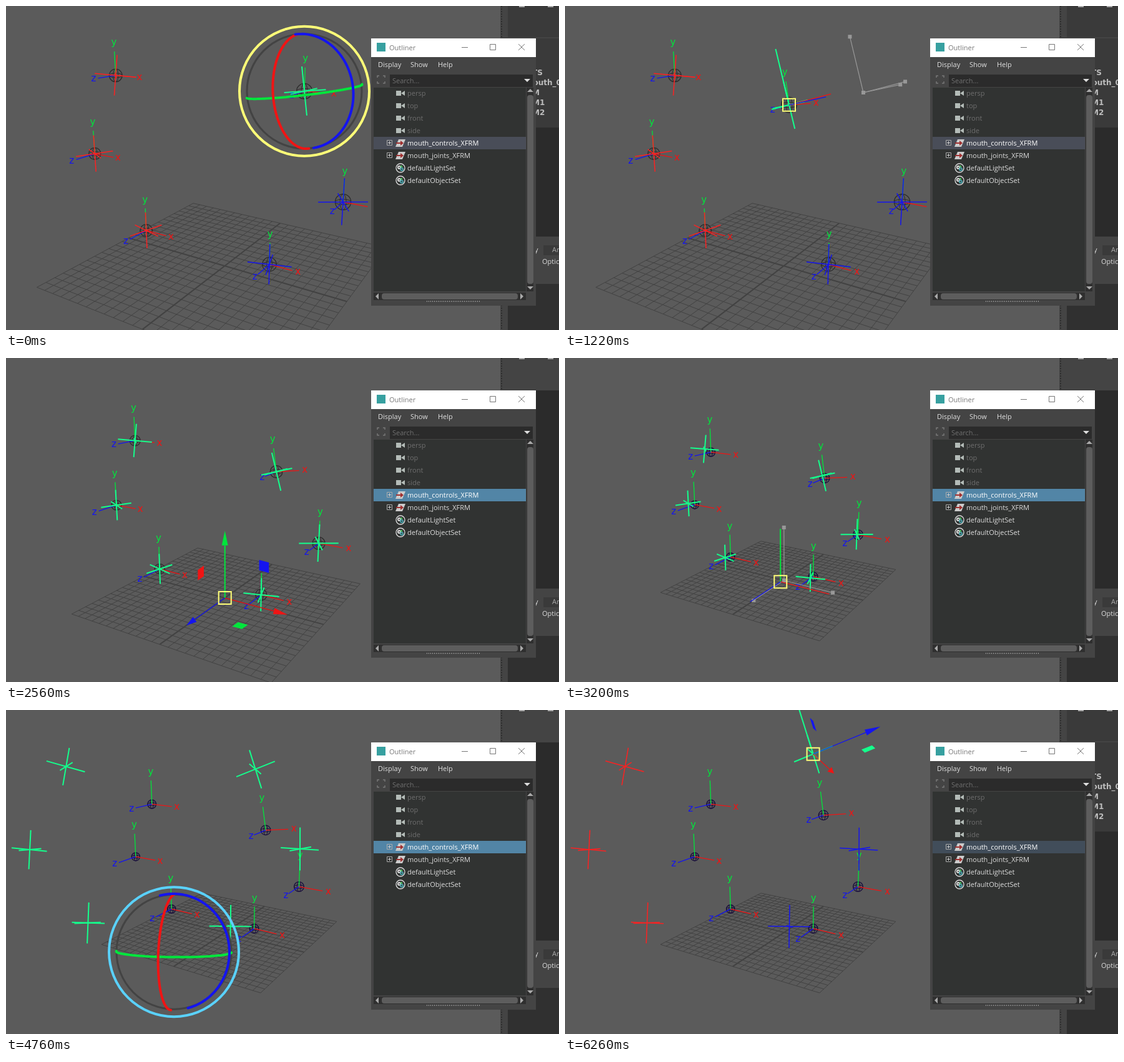
Animation, 886 px wide and 520 px high, one loop 6.8 s. Source, as an HTML page with a canvas:

```html
<!DOCTYPE html>
<html lang="en">
<head>
<meta charset="utf-8">
<title>Outliner</title>
<style>
html, body { margin: 0; width: 100%; height: 100%; overflow: hidden; background: #5b5b5b; }
canvas { display: block; }
</style>
</head>
<body>
<canvas id="stage" width="886" height="520"></canvas>
<script>
const g = document.getElementById('stage').getContext('2d');
const LOOP = 6800, SELECT_ALL = 2120, GROUP_DRAG = 3080, ROTATE = 4000, SELECT_ONE = 4860, PULL = 5000;
const RED = '#f01414', GREEN = '#00e63c', BLUE = '#1414f0', PICK = '#14ff8c', YELLOW = '#ffff78';
const UI = '11px "Open Sans", sans-serif', RAD = Math.PI / 180;

// Camera: focal length, picture centre, yaw, pitch, place of the world origin
const FOCAL = 855, CENTRE = [352, 232], YAW = 31.5 * RAD, PITCH = 15.43 * RAD;
const ORIGIN = [-.09, 10.98, 75.1], DOLLY = 24.4;

// Rig points in the plane z = 2, with the yaw and roll of their controls
const rig = [
  { x: -10.7, y: 17.6, yaw: -45, roll: -7 },
  { x: -14.1, y: 9.5, yaw: -63, roll: 0 },
  { x: -7.8, y: 2.6, yaw: -76, roll: 0 },
  { x: 5.7, y: 2.6, yaw: -18, roll: 0 },
  { x: 11.8, y: 9.5, yaw: -32, roll: 0 },
  { x: 7.1, y: 16, yaw: 9, roll: 18 }];
const TIP = 5;
const GROUP_MOVE = [8.25, 8.4, 22.6];
const PULL_FROM = [12, -14];

const add = (a, b) => a.map((v, i) => v + b[i]);
const mul = (a, k) => a.map(v => v * k);
const dot = (a, b) => a.reduce((s, v, i) => s + v * b[i], 0);

// Rotate v about the vector r, whose length is the angle in degrees
function turn(v, r) {
  const deg = Math.hypot(...r);
  if (!deg) return v;
  const [x, y, z] = mul(r, 1 / deg), c = Math.cos(deg * RAD), s = Math.sin(deg * RAD);
  const side = [y * v[2] - z * v[1], z * v[0] - x * v[2], x * v[1] - y * v[0]];
  return add(add(mul(v, c), mul(side, s)), mul([x, y, z], dot([x, y, z], v) * (1 - c)));
}

// World direction in camera space: right, down, forward
function view([x, y, z]) {
  const across = x * Math.cos(YAW) - z * Math.sin(YAW), depth = -x * Math.sin(YAW) - z * Math.cos(YAW);
  return [across, -y * Math.cos(PITCH) - depth * Math.sin(PITCH), depth * Math.cos(PITCH) - y * Math.sin(PITCH)];
}
const screen = q => [CENTRE[0] + FOCAL * q[0] / q[2], CENTRE[1] + FOCAL * q[1] / q[2]];
// How a short camera space direction at q appears on the screen
const slant = (q, v) => [v[0] - q[0] / q[2] * v[2], v[1] - q[1] / q[2] * v[2]];
const shift = (q, px) => add(q, [px[0] * q[2] / FOCAL, px[1] * q[2] / FOCAL, 0]);

// Camera space axes y, x, z after roll, yaw and a free rotation
function frame(yaw = 0, roll = 0, spin = [0, 0, 0], side = 1) {
  return [[0, 1, 0], [1, 0, 0], [0, 0, side]].map(v => view(turn(turn(turn(v, [0, 0, roll]), [0, -yaw, 0]), spin)));
}

// Smooth curve through keys [time, values...] without overshoot
function track(t, keys) {
  const last = keys.length - 1;
  if (t <= keys[0][0]) return keys[0].slice(1);
  if (t >= keys[last][0]) return keys[last].slice(1);
  const i = keys.findIndex(k => k[0] > t) - 1, h = keys[i + 1][0] - keys[i][0], u = (t - keys[i][0]) / h;
  const slope = (n, j) => (keys[n + 1][j] - keys[n][j]) / (keys[n + 1][0] - keys[n][0]);
  const tangent = (n, j) => {
    if (n < 1 || n >= last) return 0;
    const a = slope(n - 1, j), b = slope(n, j);
    return a * b <= 0 ? 0 : 2 * a * b / (a + b);
  };
  return keys[i].slice(1).map((p, n) => {
    const j = n + 1, q = keys[i + 1][j], v = 1 - u;
    return p * (1 + 2 * u) * v * v + q * u * u * (3 - 2 * u)
      + h * u * v * (tangent(i, j) * v - tangent(i + 1, j) * u);
  });
}

function path(points, color, width = 1, closed = false) {
  g.beginPath();
  points.forEach(p => g.lineTo(p[0], p[1]));
  if (closed) g.closePath();
  g.strokeStyle = color; g.lineWidth = width; g.stroke();
}
function poly(points, color) {
  g.beginPath();
  points.forEach(p => g.lineTo(p[0], p[1]));
  g.fillStyle = color; g.fill();
}
function rect(x, y, w, h, color) { g.fillStyle = color; g.fillRect(x, y, w, h); }
function pill(x, y, w, h, color) {
  g.beginPath(); g.roundRect(x, y, w, h, 4); g.fillStyle = color; g.fill();
}
function oval(x, y, rx, ry, color, width = 1) {
  g.beginPath(); g.ellipse(x, y, rx, ry, 0, 0, 7);
  g.strokeStyle = color; g.lineWidth = width; g.stroke();
}
function text(s, x, y, color, font = UI, align = 'left') {
  g.font = font; g.textAlign = align; g.fillStyle = color; g.fillText(s, x, y + 4);
}

function grid(place) {
  for (let i = -12; i <= 12; i++) {
    const line = (a, b) => path([screen(place(a)), screen(place(b))], '#424242', i ? 1 : 2);
    line([i, 0, -12], [i, 0, 12]);
    line([-12, 0, i], [12, 0, i]);
  }
}

function joint(q, roll, color) {
  const [x, y] = screen(q), r = .6 * FOCAL / q[2];
  oval(x, y, r, r, color, 1.3);
  oval(x, y, r, r * .35, color);
  oval(x, y, r * .4, r, color);
  frame(0, roll).forEach((axis, n) => {
    const v = mul(slant(q, axis), 51), ink = [GREEN, RED, BLUE][n];
    path([[x, y], add([x, y], mul(v, n ? .8 : .75))], ink, 1.3);
    text('yxz'[n], x + v[0], y + v[1] - (n ? 0 : 1), ink, '15px "DejaVu Sans", sans-serif', 'center');
  });
}

function cross(q, axes, color, width) {
  axes.forEach(v => path([screen(add(q, mul(v, -1.9))), screen(add(q, mul(v, 1.9)))], color, width));
}

// Rotate tool: the near half of each great circle
function rings(q, axes, outer) {
  const p = screen(q);
  oval(...p, 92, 92, '#434343', 3);
  axes.forEach((_, n) => {
    const u = axes[(n + 1) % 3], w = axes[(n + 2) % 3];
    const at = a => add(mul(u, Math.cos(a)), mul(w, Math.sin(a)));
    g.beginPath();
    for (let i = 0; i < 90; i++) {
      const a = at(i * 4 * RAD), b = at((i + 1) * 4 * RAD);
      if (dot(a, q) > 0) continue;
      g.moveTo(...add(p, mul(slant(q, a), 92)));
      g.lineTo(...add(p, mul(slant(q, b), 92)));
    }
    g.lineCap = 'round';
    g.strokeStyle = [GREEN, RED, BLUE][n]; g.lineWidth = 4; g.stroke();
    g.lineCap = 'butt';
  });
  oval(...p, 104, 104, outer, 4);
}

// Move tool; while dragging, grey handles stay at the start
function mover(q, axes, colors, start) {
  const p = screen(q), arms = axes.map(v => mul(slant(q, v), 92));
  if (start) {
    const ends = arms.map(v => add(start, v));
    ends.forEach(e => path([start, e], '#989898', 1.2));
    [start, ...ends].forEach(e => rect(e[0] - 3, e[1] - 3, 6, 6, '#989898'));
  }
  arms.forEach((v, n) => {
    const end = add(p, v), side = mul([-v[1], v[0]], 5 / Math.hypot(...v));
    path([p, end], colors[n], n ? 1.3 : 2);
    if (start) return;
    poly([add(end, side), add(p, mul(v, 1.28)), add(end, mul(side, -1))], colors[n]);
    const a = arms[(n + 1) % 3], b = arms[(n + 2) % 3];
    const at = (j, k) => add(p, add(mul(a, j), mul(b, k)));
    poly([at(.7, .7), at(.9, .7), at(.9, .9), at(.7, .9)], colors[n]);
  });
  path([[-10, -10], [10, -10], [10, 10], [-10, 10]].map(v => add(p, v)), YELLOW, 2, true);
}

function scene(t) {
  const all = t >= SELECT_ALL && t < SELECT_ONE;
  const [dolly] = track(t, [[2360, DOLLY], [2800, 0]]);
  const [sway] = track(t, [[0, 8.6], [360, -10], [600, 4], [780, 0]]);
  const [go] = track(t, [[GROUP_DRAG, 0], [3200, .1], [3980, 1]]);
  const spin = track(t, [[ROTATE, 0, 0, 0], [4160, -1.8, -.9, -2.9], [4520, -24, 25, 8], [4800, -19.5, 20.5, 6.5]]);
  // Pixels by which the single control is pulled off its place
  const pull = track(t, [[1000, 24, -33], [1220, -95, -11], [1460, -46, -2], [1700, 28, -34], [1940, 0, 0],
    [4500, 0, 0], [4760, ...PULL_FROM], [PULL, ...PULL_FROM], [5300, -40, -16], [5480, -62, -7],
    [5720, -30, 34], [5960, 17, -13], [6080, 17, -29], [6260, 10, -38]]);
  const jointPull = t < ROTATE ? pull : t < PULL ? [0, 0] : add(pull, mul(PULL_FROM, -1));

  const place = p => add(add(view(p), ORIGIN), [0, 0, -dolly]);
  const move = mul(GROUP_MOVE, go), pivot = place(move);
  const joints = rig.map(r => place([r.x, r.y, 2]));
  const controls = rig.map(r => place(add(move, turn([r.x, r.y, 2], spin))));
  const before = controls[TIP];
  joints[TIP] = shift(joints[TIP], jointPull);
  controls[TIP] = shift(before, pull);
  const axes = rig.map((r, i) => frame(r.yaw, r.roll - (i === TIP ? sway : 0), spin, i === TIP ? -1 : 1));

  grid(place);
  joints.forEach((q, i) => joint(q, i === TIP ? 9 - sway : 0, dolly > 12 ? '#2c2c2c' : '#170c3c'));
  controls.forEach((q, i) => {
    const picked = all || i === TIP;
    cross(q, axes[i], picked ? PICK : i < 3 ? '#ff2020' : BLUE, picked ? 2 : 1.5);
  });

  const tip = controls[TIP];
  if (t < 980) rings(tip, axes[TIP], t < 660 ? YELLOW : '#5ad2ff');
  else if (t < SELECT_ALL) mover(tip, axes[TIP], [PICK, RED, BLUE], t >= 1000 && t < 1940 && [478, 139]);
  else if (t < ROTATE) mover(pivot, frame(), [GREEN, RED, BLUE], t >= GROUP_DRAG && t < 3980 && screen(place([0, 0, 0])));
  else if (t < SELECT_ONE) rings(pivot, frame(0, 0, spin), '#5ad2ff');
  else mover(tip, axes[TIP], [PICK, BLUE, RED], t >= PULL && t < 6260 && screen(shift(before, PULL_FROM)));
}

function sidePanel(t) {
  const hidden = t >= SELECT_ALL && t < SELECT_ONE;
  rect(792, 0, 94, 520, '#444');
  for (let y = 0; y < 520; y += 4) rect(793, y, 2, 2, '#2e2e2e');
  rect(804, 0, 82, 50, hidden ? '#444' : '#3a3a3a');
  rect(804, 481, 82, 39, '#303030');
  rect(822, 0, 9, 2, '#aaa');
  rect(868, 0, 9, 2, '#aaa');
  rect(849, 52, 37, 143, hidden ? '#2b2b2b' : '#3a3a3a');
  rect(849, 195, 37, 175, '#2b2b2b');
  rect(849, 446, 37, 35, '#303030');
  rect(861, 384, 25, 16, '#3a3a3a');
  const bold = 'bold 12px "DejaVu Sans", sans-serif';
  if (!hidden) ['TS', 'mouth_0', 'M', 'M1', 'M2'].forEach((s, i) => text(s, i === 1 ? 832 : 843, 107 + 16 * i, '#bdbdbd', bold));
  text('y', 847, 391, '#ddd');
  text('Ar', 875, 391, '#aaa');
  text('Optic', 859, 410, '#ddd');
}

function outliner(t) {
  const active = t >= SELECT_ALL && t < 2360, ink = active ? '#fff' : '#777';
  rect(585, 52, 264, 429, '#444');
  rect(585, 52, 264, 30, active ? '#000' : '#fff');
  rect(594, 59, 14, 14, '#37a0a0');
  text('Outliner', 614, 67, ink);
  path([[730, 66.5], [740, 66.5]], ink);
  path([[775.5, 61.5], [784.5, 61.5], [784.5, 70.5], [775.5, 70.5]], ink, 1, true);
  path([[821, 61], [831, 71]], ink);
  path([[831, 61], [821, 71]], ink);
  [['Display', 596], ['Show', 648], ['Help', 692]].forEach(([s, x]) => text(s, x, 94, '#e0e0e0'));

  rect(615, 110, 229, 20, '#2b2b2b');
  text('Search...', 619, 120, '#707070');
  poly([[830, 117], [840, 117], [835, 122]], '#ddd');
  for (const x of [-1, 1]) for (const y of [-1, 1])
    path([[601 + 3 * x, 118 + 6 * y], [601 + 6 * x, 118 + 6 * y], [601 + 6 * x, 118 + 3 * y]], '#777', 1.5);
  rect(589, 131, 244, 327, '#313332');

  rect(834, 131, 11, 327, '#2f2f2f');
  poly([[835, 138], [845, 138], [840, 133]], '#aaa');
  pill(835, 143, 10, 303, '#5d5d5d');
  poly([[835, 450], [845, 450], [840, 455]], '#aaa');
  rect(589, 460, 244, 12, '#2f2f2f');
  poly([[597, 461], [597, 471], [592, 466]], '#aaa');
  pill(602, 461, 218, 10, '#5d5d5d');
  poly([[824, 461], [824, 471], [829, 466]], '#aaa');
  for (let x = 674; x < 760; x += 3) rect(x, 473, 1, 2, '#999');

  rect(589, 210, 244, 20, t < SELECT_ALL ? '#494d58' : t < SELECT_ONE ? '#5285a6' : '#414d5a');
  ['persp', 'top', 'front', 'side'].forEach((s, i) => {
    const y = 140 + 20 * i;
    rect(625, y - 4, 8, 8, '#b4bcb8');
    poly([[633, y], [639, y - 4], [639, y + 4]], '#b4bcb8');
    text(s, 643, y, '#6e6e6e');
  });
  ['mouth_controls_XFRM', 'mouth_joints_XFRM'].forEach((s, i) => {
    const y = 220 + 20 * i;
    path([[610.5, y - 4.5], [618.5, y - 4.5], [618.5, y + 3.5], [610.5, y + 3.5]], '#aaa', 1, true);
    path([[612, y - .5], [617, y - .5]], '#ccc');
    path([[614.5, y - 3], [614.5, y + 2]], '#ccc');
    poly([[629, y - 6], [640, y - 6], [635, y + 6], [624, y + 6]], '#ccc');
    path([[625, y], [633, y]], '#a03030', 2);
    poly([[632, y - 4], [637, y], [632, y + 4]], '#a03030');
    text(s, 643, y, i ? '#ddd' : '#fff');
  });
  ['defaultLightSet', 'defaultObjectSet'].forEach((s, i) => {
    const y = 260 + 20 * i;
    oval(632, y, 7, 7, '#ddd', 1.3);
    oval(630, y - 1, 2, 2, '#ddd', 2);
    oval(634, y + 2, 2, 2, '#48a0a8', 2);
    rect(632, y - 4, 3, 3, '#50b060');
    text(s, 643, y, '#ddd');
  });
}

function draw(now) {
  const t = now % LOOP;
  rect(0, 0, 886, 520, '#5b5b5b');
  scene(t);
  sidePanel(t);
  outliner(t);
  requestAnimationFrame(draw);
}
requestAnimationFrame(draw);
</script>
</body>
</html>
```
